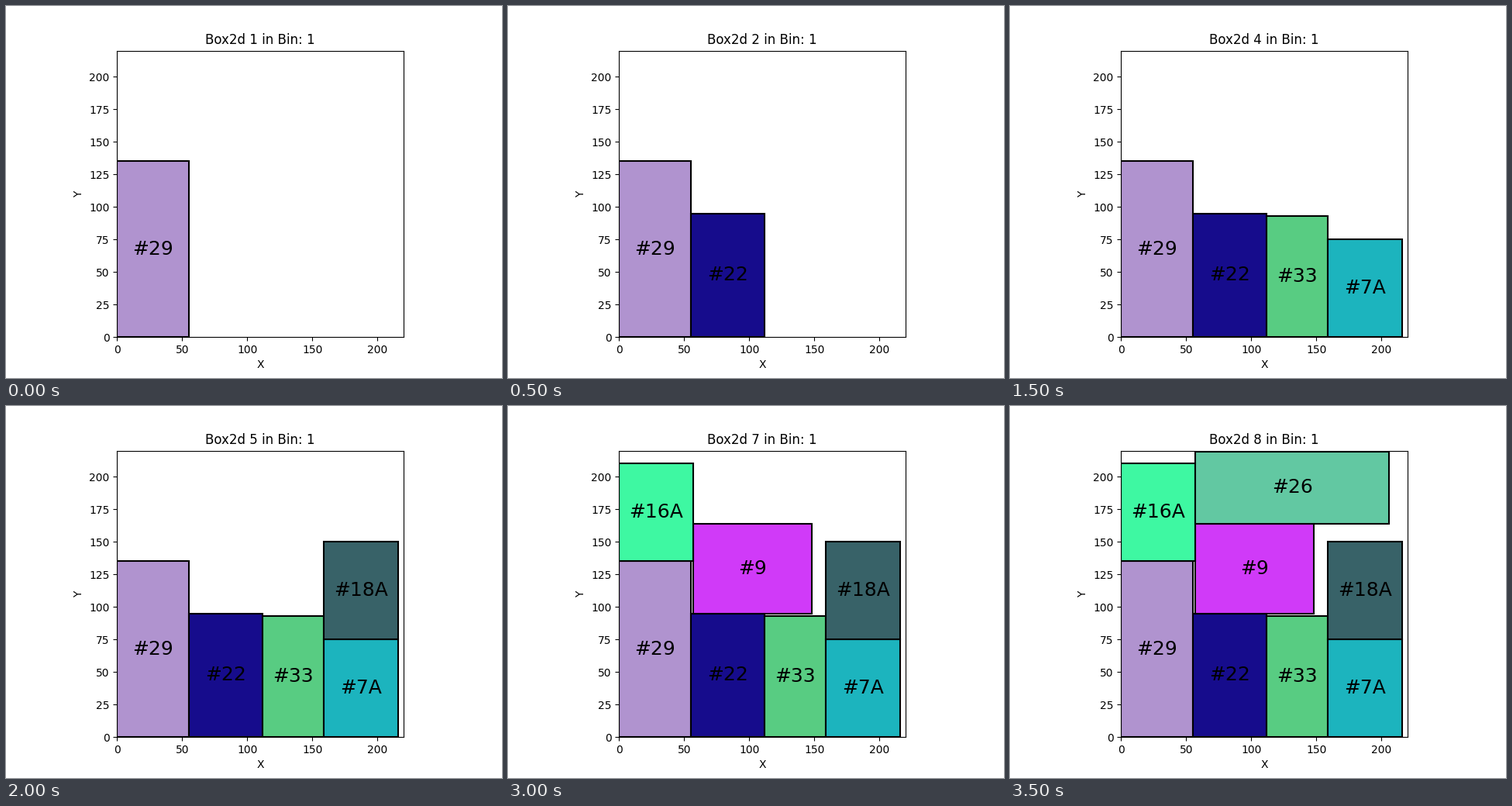
Animation, 640 px wide and 480 px high, one loop 4000 ms. Source, as a matplotlib script:

```python
import matplotlib.pyplot as plt
from matplotlib.animation import FuncAnimation
from matplotlib.patches import Rectangle

SIDE = 220

# label, x, y, width, height, colour, in packing order
BOXES = [
    ("#29", 0, 0, 55, 135, "#b093cf"),
    ("#22", 55, 0, 57, 95, "#160c8c"),
    ("#33", 112, 0, 47, 93, "#58cc82"),
    ("#7A", 159, 0, 57, 75, "#1cb4be"),
    ("#18A", 159, 75, 57, 75, "#386268"),
    ("#9", 57, 95, 91, 69, "#d03af8"),
    ("#16A", 0, 135, 57, 75, "#3ef8a2"),
    ("#26", 57, 164, 149, 55, "#62c8a2"),
]

plt.rcParams["font.family"] = "DejaVu Sans"
fig, ax = plt.subplots(figsize=(6.4, 4.8), dpi=100)
ax.set_aspect("equal")
ax.set(xlim=(0, SIDE), ylim=(0, SIDE), xlabel="X", ylabel="Y")
ax.set_xticks(range(0, SIDE, 50))
ax.set_yticks(range(0, SIDE, 25))
title = ax.set_title("")


def add_box(label, x, y, w, h, color):
    rect = ax.add_patch(Rectangle((x, y), w, h, facecolor=color,
                                  edgecolor="black", linewidth=1.5))
    text = ax.text(x + w / 2, y + h / 2, label, fontsize=18,
                   ha="center", va="center")
    return rect, text


parts = [add_box(*box) for box in BOXES]


def update(frame):
    for i, pair in enumerate(parts):
        for artist in pair:
            artist.set_visible(i <= frame)
    title.set_text(f"Box2d {frame + 1} in Bin: 1")
    return [title, *(artist for pair in parts for artist in pair)]


anim = FuncAnimation(fig, update, frames=len(BOXES), interval=500,
                     repeat=True, repeat_delay=0, blit=False)
plt.show()
```
